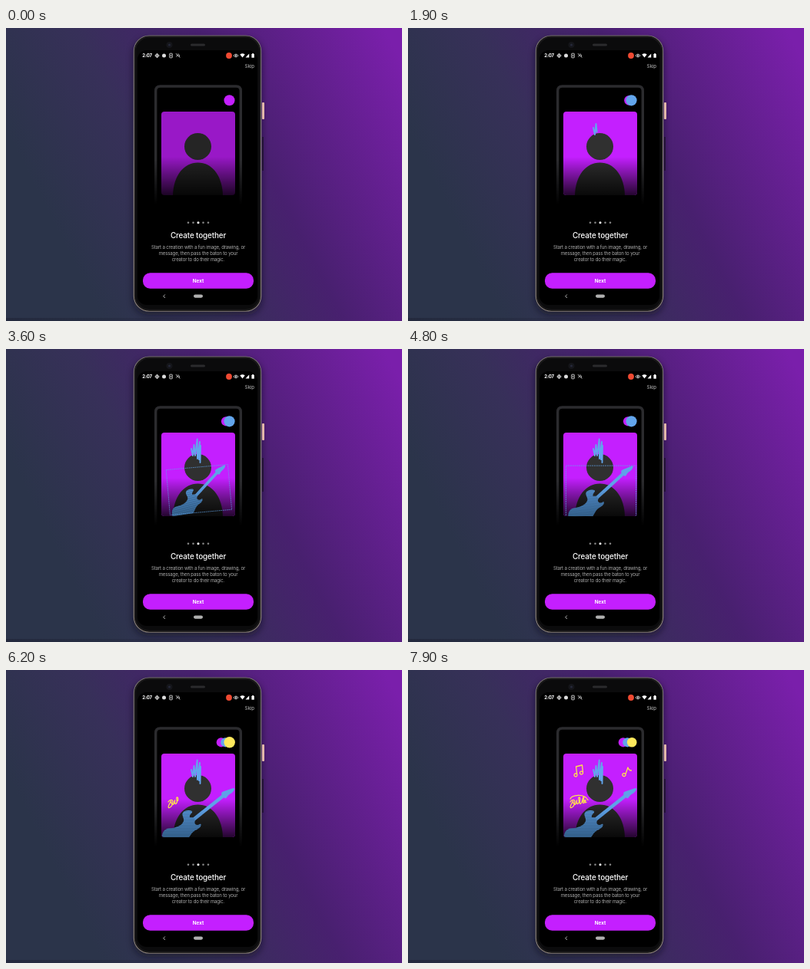
An HTML page for the animation above (8 s loop, 515x382 px).

```html
<!DOCTYPE html>
<html lang="en">
<head>
<meta charset="utf-8">
<title>Create together</title>
<style>
  html, body { margin: 0; width: 100%; height: 100%; overflow: hidden; background: #2b344a; }
  svg { display: block; width: 515px; height: 382px; }
  text { font-family: Inter, "Open Sans", sans-serif; }
  .mid { text-anchor: middle; }
  .copy { font-size: 6.1px; letter-spacing: -.16px; fill: #adadad; }
  .pen { fill: none; stroke-linecap: round; stroke-linejoin: round; stroke-dasharray: 1 2; }
  .yellow { stroke: #ffe14d; stroke-width: 1.3; }
</style>
</head>
<body>
<svg viewBox="0 0 515 382">
  <defs>
    <linearGradient id="bg" gradientUnits="userSpaceOnUse" x1="70" y1="270" x2="515" y2="45">
      <stop offset="0" stop-color="#2b344a"/>
      <stop offset=".28" stop-color="#373059"/>
      <stop offset=".56" stop-color="#48206f"/>
      <stop offset="1" stop-color="#7a1fab"/>
    </linearGradient>
    <linearGradient id="floor">
      <stop offset="0" stop-color="#151526" stop-opacity=".35"/>
      <stop offset=".6" stop-color="#151526" stop-opacity="0"/>
    </linearGradient>
    <linearGradient id="rim" x1="0" y1="0" x2="0" y2="1">
      <stop offset="0" stop-color="#77716f"/>
      <stop offset=".5" stop-color="#98908b"/>
      <stop offset="1" stop-color="#8a8078"/>
    </linearGradient>
    <linearGradient id="shade" gradientUnits="userSpaceOnUse" x1="0" y1="168" x2="0" y2="222">
      <stop offset="0" stop-color="#000" stop-opacity="0"/>
      <stop offset="1" stop-color="#000" stop-opacity=".88"/>
    </linearGradient>
    <linearGradient id="vanish" gradientUnits="userSpaceOnUse" x1="0" y1="172" x2="0" y2="230">
      <stop offset="0" stop-color="#000" stop-opacity="0"/>
      <stop offset="1" stop-color="#000"/>
    </linearGradient>
    <linearGradient id="wood" gradientUnits="userSpaceOnUse" x1="0" y1="178" x2="0" y2="220">
      <stop offset="0" stop-color="#5fa2e8"/>
      <stop offset="1" stop-color="#386894"/>
    </linearGradient>
    <pattern id="stripes" width="4" height="2" patternUnits="userSpaceOnUse">
      <path d="M0 .5H4" stroke="#152c48" stroke-width=".6"/>
    </pattern>
    <filter id="soft" x="-20%" y="-20%" width="140%" height="140%"><feGaussianBlur stdDeviation="4"/></filter>
    <clipPath id="card"><rect x="202" y="109" width="96" height="109" rx="4"/></clipPath>
    <path id="body" d="M203 221C202 212 206 207 212 206.500C221 206 229 203 231 197C232 193 228 190 230 186C232 183 238 182 242 184C243 187 238 188 239 192L243.600 192.200L246.400 195.800C244 199 246 202 249 202C251 202 252 200 253.500 201C254 205 250 207 246 209C241 212 240 216 236 221Z"/>
    <path id="neck" d="M241 194.300L280.600 162.700Q279 159.500 283 158.300L294 154.500Q298.500 153 296.500 157C295 160 291 161.500 289 163.500C287 166 286 169 283.400 166.300L244 197.700Z"/>
  </defs>

  <rect width="515" height="382" fill="url(#bg)"/>
  <rect y="378" width="515" height="4" fill="url(#floor)"/>
  <rect x="165" y="14" width="168" height="360" rx="20" fill="#080812" opacity=".5" filter="url(#soft)"/>

  <!-- handset -->
  <rect x="333" y="97" width="3" height="22" rx="1" fill="#e3b8aa"/>
  <path d="M334 142v44" stroke="#241437" stroke-width="2"/>
  <rect x="166.300" y="10" width="165.400" height="359.200" rx="20" fill="#0b0b0c" stroke="url(#rim)" stroke-width="1.100"/>
  <rect x="168" y="11.700" width="162" height="355.800" rx="18.500" fill="none" stroke="#1b1a1b" stroke-width="1.500"/>
  <rect x="171" y="29" width="156" height="332" rx="12"/>
  <rect x="240" y="20.500" width="19" height="3" rx="1.500" fill="#2b2b2d"/>
  <circle cx="212.500" cy="22" r="4" fill="#15161a"/>
  <circle cx="212.500" cy="22" r="1.500" fill="#25283a"/>

  <!-- status bar -->
  <text x="177.300" y="38.300" font-size="6.100" font-weight="700" fill="#fff" letter-spacing="-.2">2:07</text>
  <g fill="none" stroke="#ddd" stroke-width=".9">
    <circle cx="196.500" cy="36" r="2.100"/>
    <path d="M193.500 36h6M196.500 33v6"/>
    <rect x="212.700" y="33.200" width="3.600" height="5.600" rx=".6"/>
    <path d="M214.500 34.800v2.400M221 33.200l5.200 5.400M221.500 37.500q1.400-1 1.200-2.500M223.500 33.600q2 .5 2 3.500"/>
    <path d="M296 36q3-3.800 6 0q-3 3.800-6 0z"/>
  </g>
  <circle cx="205.500" cy="36" r="2.500" fill="#ddd"/>
  <circle cx="290" cy="36" r="3.900" fill="#f04a32"/>
  <g fill="#fff">
    <circle cx="299" cy="36" r="1"/>
    <path d="M304.300 34.400q3.200-2.500 6.400 0l-3.200 4.200zM311.500 38.600l4.700-5v5z"/>
    <rect x="319.400" y="33.700" width="3.400" height="5.100" rx=".6"/>
    <rect x="320.300" y="33" width="1.600" height="1"/>
  </g>
  <text class="mid" x="316.700" y="52.200" font-size="6.300" fill="#bdbdbd" letter-spacing="-.1">Skip</text>

  <!-- preview -->
  <path d="M194.700 231V82q0-6 6-6H299.300q6 0 6 6V231" fill="none" stroke="#2b2b2e" stroke-width="3.400"/>
  <rect x="192" y="172" width="9" height="60" fill="url(#vanish)"/>
  <rect x="299" y="172" width="9" height="60" fill="url(#vanish)"/>

  <circle id="purple" cy="94.300" fill="#c41fff"/>
  <circle id="blue" cy="94.300" fill="#62a5ec"/>
  <circle id="gold" cy="94.300" fill="#ffe95c"/>

  <g clip-path="url(#card)">
    <g id="photo">
      <rect x="202" y="109" width="96" height="109" fill="#c41fff"/>
      <path d="M217 220C217 193 231 175.500 249.500 175.500S282 193 282 220z" fill="#303030"/>
      <circle cx="249.500" cy="154.500" r="17.500" fill="#303030"/>
      <rect x="202" y="165" width="96" height="54" fill="url(#shade)"/>
    </g>
    <path id="hair" class="pen" pathLength="1" stroke="#62a5ec" stroke-width="1.900"
      d="M241 130L243 139L244.500 125L246 139L248.700 117.500L249 143L252 121L251 144L253 126L252.500 148"/>
    <g id="guitar">
      <use href="#neck" fill="url(#wood)"/>
      <use href="#body" fill="url(#wood)"/>
      <use href="#body" fill="url(#stripes)" opacity=".6"/>
      <rect id="frame" x="202" y="150.500" width="97" height="71" transform="rotate(4 250 186)"
        fill="none" stroke="#62a5ec" stroke-width=".8" stroke-dasharray="2 1"/>
    </g>
    <path id="word" class="pen yellow" pathLength="1"
      d="M211 172C213 169 217 168 217 172C217 176 214 180 211.500 179.500C210 178 213 174 214.500 171C215 175 217 177 218.500 174L219.500 170C219 175 221 176 222.500 172C222 168 221 166 223 166C225 167 222 174 224 174.500C227 174 227 166 228.500 165C230 166 226 173 228 173.500C230 173 232 170 230.500 169.500C228 170 229 174 232 172.500"/>
    <path id="arc" class="pen yellow" pathLength="1" d="M211 168C213 163 229 160 234 169.500"/>
    <path id="noteA" class="pen yellow" pathLength="1"
      d="M220 136.500A2 2 0 1 1 219.800 136L218.500 126L226.500 124L227.500 133.800A2 2 0 1 1 227.300 133.200"/>
    <path id="noteB" class="pen yellow" pathLength="1"
      d="M283 136.500A2.100 2 0 1 1 282.900 136L286 127Q287 131 290.500 131"/>
  </g>

  <!-- page text -->
  <g id="dots"></g>
  <text class="mid" x="250" y="273.700" font-size="9.900" font-weight="500" fill="#fff" letter-spacing="-.13">Create together</text>
  <text class="mid copy" x="250" y="288">Start a creation with a fun image, drawing, or</text>
  <text class="mid copy" x="250" y="296">message, then pass the baton to your</text>
  <text class="mid copy" x="250" y="304">creator to do their magic.</text>
  <rect x="178" y="319.300" width="144" height="20.400" rx="9.500" fill="#c41fff"/>
  <text class="mid" x="250" y="331.800" font-size="6.300" font-weight="700" fill="#fff">Next</text>
  <path d="M206.800 347.500l-2 2.200l2 2.200" fill="none" stroke="#ccc" stroke-width=".9"/>
  <rect x="244" y="347.500" width="12" height="4.200" rx="2.100" fill="#b0b0b0"/>
</svg>
<script>
const LOOP = 8000, STEP = 100;
const el = id => document.getElementById(id);
const set = (id, attrs) => Object.entries(attrs).forEach(([k, v]) => el(id).setAttribute(k, v));
const ease = p => p * p * (3 - 2 * p);

el('dots').innerHTML = [237, 243.5, 250, 256.5, 263].map((x, i) =>
  `<circle cx="${x}" cy="253.800" r="${i === 2 ? 1.5 : 1.3}" fill="${i === 2 ? '#fff' : '#858585'}"/>`).join('');

function progress(t, from, to) {
  return Math.min(1, Math.max(0, (t - from) / (to - from)));
}

// Keys are [time, value, ...] rows, eased between neighbours.
function track(t, keys) {
  let i = 0;
  while (i < keys.length - 2 && t >= keys[i + 1][0]) i++;
  const [a, b] = [keys[i], keys[i + 1]];
  const p = ease(progress(t, a[0], b[0]));
  return a.slice(1).map((v, n) => v + (b[n + 1] - v) * p);
}

// Centre x, radius
const circles = {
  purple: [[1600, 290.5, 7], [2100, 286, 6.1], [5600, 286, 6.1], [6050, 279.8, 6.1]],
  blue: [[1500, 290.5, 0], [1800, 290.5, 7.1], [5600, 290.5, 7.1], [6050, 285.3, 6.1]],
  gold: [[5550, 290.7, 0], [5850, 290.7, 7.2], [6300, 290.7, 7.2], [6700, 291.2, 6.3]]
};

// Centre x, centre y, angle, scale
const guitarPath = [
  [2800, 250.5, 182, -9, .78],
  [3600, 250.5, 183.5, -9, .83],
  [4700, 250.5, 185.5, -4, .94],
  [4900, 250.5, 185.5, -4, .94],
  [5500, 250, 186, 0, 1]
];

const strokes = {
  hair: [1700, 2700],
  word: [5700, 6500],
  arc: [6500, 6700],
  noteA: [6800, 7200],
  noteB: [7250, 7550]
};

function draw(t) {
  set('photo', { opacity: .78 + .22 * progress(t, 0, 200) });
  for (const id in circles) {
    const [cx, r] = track(t, circles[id]);
    set(id, { cx, r });
  }
  for (const id in strokes) {
    const p = progress(t, ...strokes[id]);
    set(id, { 'stroke-dashoffset': 1 - p, opacity: p > 0 ? 1 : 0 });
  }
  const [x, y, angle, scale] = track(t, guitarPath);
  set('guitar', {
    opacity: progress(t, 2700, 3000),
    transform: `translate(${x} ${y}) rotate(${angle}) scale(${scale}) translate(-250 -186)`
  });
  set('frame', { opacity: t < 5600 ? 1 : 0 });
}

const start = performance.now();
function tick() {
  const t = (performance.now() - start) % LOOP;
  draw(Math.floor(t / STEP) * STEP);
  requestAnimationFrame(tick);
}
tick();
</script>
</body>
</html>
```
